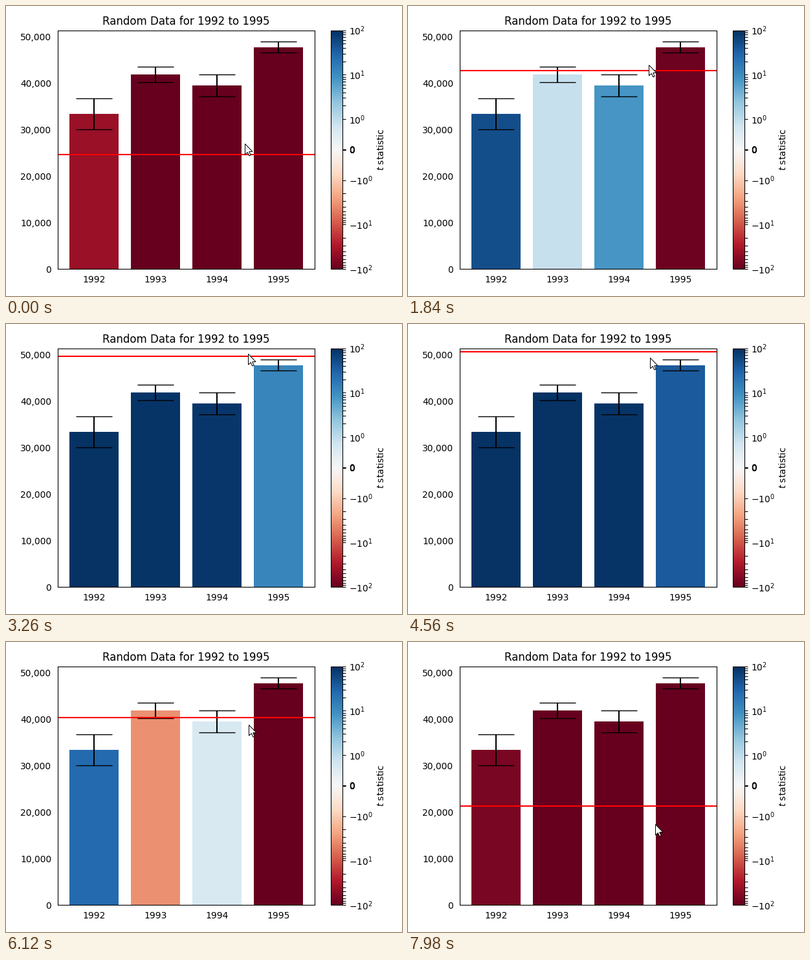
A matplotlib script for the animation above (8 s loop, 612 px wide and 449 px high).

```python
import numpy as np
import matplotlib.pyplot as plt
from matplotlib.animation import FuncAnimation
from matplotlib.cm import ScalarMappable
from matplotlib.colors import SymLogNorm
from matplotlib.patches import Polygon

W, H, DPI = 612, 449, 100
LOOP, INTERVAL = 8000, 40
HOLD = 3            # animation frames per visible update
LEAD = 200          # ms by which the pointer runs ahead of the line
LEFT, BOTTOM, WIDTH, HEIGHT = 80, 41.8, 396.8, 369.6

plt.rcParams.update({"font.family": "DejaVu Sans", "font.size": 10})

np.random.seed(12345)
samples = np.array([np.random.normal(mean, spread, 3650) for mean, spread in
                    ((32000, 200000), (43000, 100000),
                     (43500, 140000), (48000, 70000))])
means = samples.mean(axis=1)
errors = samples.std(axis=1, ddof=1) / np.sqrt(samples.shape[1])
y_max = 1.05 * (means + errors).max()
cmap = plt.get_cmap("RdBu")

# Key points of the motion: time in ms, pixel row
PATH = np.transpose([(0, 230), (1080, 140), (1280, 126), (2520, 65),
                     (3600, 43), (4560, 43), (6120, 117), (7200, 177),
                     (7400, 191), (7920, 254), (8120, 282)])
ARROW = np.array([(0, 0), (0, 16.5), (3.8, 13), (6.3, 18.5), (8.7, 17.5),
                  (6.3, 12), (11.5, 12)])


def row_at(ms):
    return np.round(np.interp(ms, *PATH))


def column_at(ms):
    return np.round(np.interp(ms, (1080, 2520, 7200, 7920),
                              (369, 374, 375, 382)))


def pixel_axes(left, bottom, width, height):
    return fig.add_axes([left / W, bottom / H, width / W, height / H])


def add_colorbar(cax):
    norm = SymLogNorm(1, linscale=1, vmin=-100, vmax=100, base=np.e)
    bar = fig.colorbar(ScalarMappable(norm, cmap), cax=cax)
    ticks, labels = [-0.01, 0, 0.01], ["0"] * 3
    for sign, prefix in ((1, ""), (-1, "-")):
        for power in range(3):
            for digit in range(1, 10 if power < 2 else 2):
                ticks.append(sign * digit * 10 ** power)
                text = rf"$\mathdefault{{{prefix}10^{{{power}}}}}$"
                labels.append(text if digit == 1 else "")
    bar.set_ticks(ticks, labels=labels)
    bar.minorticks_off()
    bar.set_label("$t$ statistic")


fig = plt.figure(figsize=(W / DPI, H / DPI), dpi=DPI, facecolor="white")
ax = pixel_axes(LEFT, BOTTOM, WIDTH, HEIGHT)
bars = ax.bar(range(4), means, yerr=errors, capsize=20, ecolor="black")
threshold = ax.axhline(0, color="red")
ax.set_xlim(-0.59, 3.59)
ax.set_ylim(0, y_max)
ax.set_xticks(range(4), [str(1992 + i) for i in range(4)])
ax.yaxis.set_major_formatter("{x:,.0f}")
ax.tick_params(left=False, bottom=False)
ax.set_title("Random Data for 1992 to 1995")

add_colorbar(pixel_axes(501.6, BOTTOM, HEIGHT / 20, HEIGHT))

overlay = pixel_axes(0, 0, W, H)
overlay.set(xlim=(0, W), ylim=(H, 0))
overlay.axis("off")
cursor = overlay.add_patch(Polygon(ARROW, facecolor="white",
                                   edgecolor="black", linewidth=0.72))


def update(frame):
    now = frame // HOLD * HOLD * INTERVAL

    value = (H - BOTTOM - row_at(now) - 0.4) / HEIGHT * y_max
    threshold.set_ydata([value, value])

    # Bars fade from red to blue as the line rises past their means
    t_stat = (value - means) / errors
    for bar, level in zip(bars, 1 / (1 + np.exp(-t_stat))):
        bar.set_facecolor(cmap(level))

    tip = column_at(now), row_at(now + LEAD)
    cursor.set_xy(ARROW + tip + 0.5)
    return [threshold, cursor, *bars]


anim = FuncAnimation(fig, update, frames=LOOP // INTERVAL, interval=INTERVAL,
                     repeat=True, repeat_delay=0)
plt.show()
```
